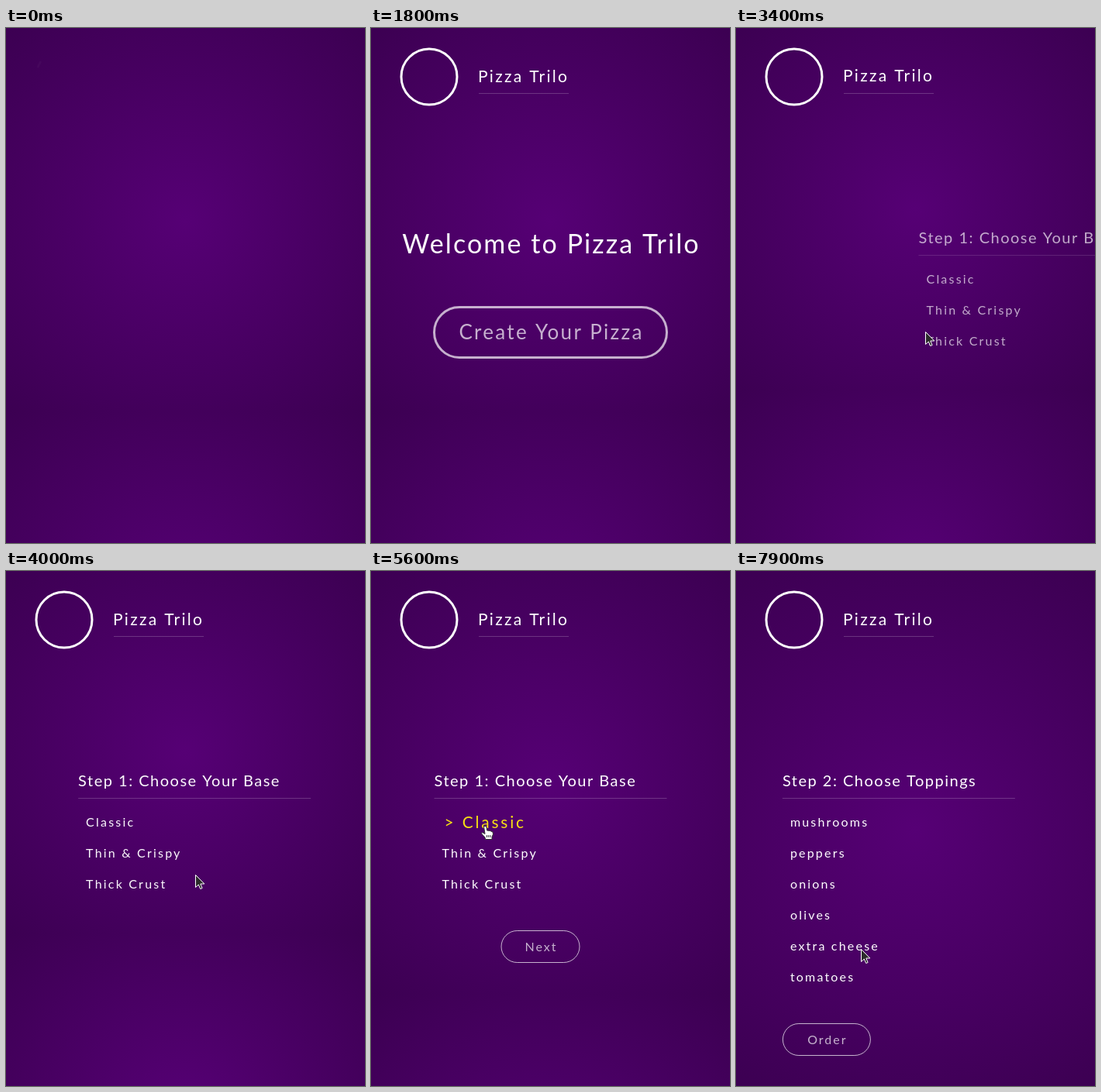
An HTML page with a canvas for the animation above (8000 ms loop, 463x665 px).

```html
<!DOCTYPE html>
<html lang="en">
<head>
<meta charset="utf-8">
<title>Pizza order</title>
<style>
html, body { margin: 0; width: 100%; height: 100%; overflow: hidden; background: #3c0052; }
canvas { display: block; width: 463px; height: 665px; }
</style>
</head>
<body>
<canvas id="stage"></canvas>
<script>
const W = 463, H = 665, LOOP = 8000;
const canvas = document.getElementById('stage');
const ctx = canvas.getContext('2d');
const dpr = window.devicePixelRatio || 1;
canvas.width = W * dpr;
canvas.height = H * dpr;

const BRAND = 'Pizza Trilo';
const BASES = ['Classic', 'Thin & Crispy', 'Thick Crust'];
const TOPPINGS = ['mushrooms', 'peppers', 'onions', 'olives', 'extra cheese', 'tomatoes'];
const LEFT = (W - 300) / 2;

// Moments of the story, in ms
const LOGO_IN = -238, HEADER_IN = 33, HOME_IN = 420, HOME_OUT = 2440, BASE_IN = 3240;
const PICK = 5311, BASE_OUT = 6568, TOPPINGS_IN = 7368;
const EXIT = 300, DELAY = 500;

// [item, pointer enters, pointer leaves]
const HOVERS = [[2, 4510, 4600], [1, 4600, 4690], [0, 4690, 5690], [1, 5690, 5770], [2, 5770, 5850]];
// [time, x, y] of the pointer tip
const POINTER = [[2000, 256, 472], [2150, 244.5, 392], [4480, 244.5, 392], [4800, 145.5, 330],
  [5650, 145.5, 330], [5950, 161.5, 488]];
const HAND_TIMES = [[2080, 2600], [4510, 5850], [5900, 6720]];

const clamp = v => Math.max(0, Math.min(1, v));
const mix = (a, b, k) => a + (b - a) * k;

// cubic-bezier(.42, 0, .58, 1)
function ease(x) {
  x = clamp(x);
  let lo = 0, hi = 1;
  for (let i = 0; i < 22; i++) {
    const s = (lo + hi) / 2, r = 1 - s;
    if (1.26 * s * r * r + 1.74 * s * s * r + s * s * s < x) lo = s; else hi = s;
  }
  return lo * lo * (3 - 2 * lo);
}

// Remaining distance (1 to 0) of a spring with damping 10 and mass 1
function spring(ms, stiffness) {
  if (ms <= 0) return 1;
  const t = ms / 1000, w = Math.sqrt(stiffness - 25);
  return Math.exp(-5 * t) * (Math.cos(w * t) + 5 / w * Math.sin(w * t));
}

// Back-and-forth between 0 and 1, 300 ms each way
function yoyo(ms) {
  if (ms <= 0) return 0;
  const p = ms / 300 % 2;
  return ease(p < 1 ? p : 2 - p);
}

function text(str, x, y, size, spacing, align = 'left') {
  ctx.font = `400 ${size}px Lato, "Open Sans", sans-serif`;
  ctx.letterSpacing = spacing + 'px';
  ctx.textAlign = align;
  ctx.fillText(str, align === 'center' ? x + spacing / 2 : x, y);
}

function rule(x, y, w) {
  ctx.fillStyle = 'rgba(255,255,255,.2)';
  ctx.fillRect(x, y, w, 1);
  ctx.fillStyle = '#fff';
}

function layer(alpha, x, draw) {
  ctx.save();
  ctx.globalAlpha = clamp(alpha);
  ctx.translate(x, 0);
  draw();
  ctx.restore();
}

function background(h) {
  const r = Math.hypot(W / 2, h / 2);
  for (let y = 0; y < H; y += h) {
    const g = ctx.createRadialGradient(W / 2, y + h / 2, 0, W / 2, y + h / 2, r);
    g.addColorStop(0, 'rgb(86,0,117)');
    g.addColorStop(1, 'rgb(60,0,82)');
    ctx.fillStyle = g;
    ctx.fillRect(0, y, W, h);
  }
}

function button(label, x, y, w, h, border, size, spacing, hover = 0) {
  const s = 1 + hover * 0.1;
  const outline = () => {
    ctx.beginPath();
    ctx.roundRect(-w / 2, -h / 2, w, h, h / 2);
  };
  ctx.save();
  ctx.globalAlpha *= 0.7;
  ctx.translate(x + w / 2, y + h / 2);
  ctx.scale(s, s);
  ctx.strokeStyle = ctx.fillStyle = '#fff';
  if (hover > 0) {
    ctx.shadowColor = `rgba(255,255,255,${hover})`;
    ctx.shadowBlur = 8 * s * dpr;
    ctx.save();
    outline();
    ctx.rect(-W, -H, 2 * W, 2 * H);
    ctx.clip('evenodd');
    outline();
    ctx.fill();
    ctx.restore();
  }
  text(label, 0, size * 0.36, size, spacing, 'center');
  ctx.shadowColor = 'transparent';
  ctx.lineWidth = border;
  ctx.beginPath();
  ctx.roundRect((border - w) / 2, (border - h) / 2, w - border, h - border, (h - border) / 2);
  ctx.stroke();
  ctx.restore();
}

function header(t) {
  const drawn = ease((t - LOGO_IN) / 2000);
  const turn = Math.PI * (ease((t - LOGO_IN) / 1000) - 1);
  layer(drawn, 0, () => {
    ctx.strokeStyle = '#fff';
    ctx.lineWidth = 3;
    ctx.lineCap = 'round';
    ctx.beginPath();
    ctx.arc(75, 63, 36, turn, turn + 2 * Math.PI * drawn);
    ctx.stroke();
  });
  ctx.save();
  ctx.translate(0, -240 * spring(t - HEADER_IN, 120));
  ctx.fillStyle = '#fff';
  text(BRAND, 138, 69.5, 21, 2.3);
  rule(139, 84, 116);
  ctx.restore();
}

function home(t) {
  if (t >= HOME_OUT + EXIT) return;
  layer(ease((t - HOME_IN) / 1500), -W * ease((t - HOME_OUT) / EXIT), () => {
    ctx.fillStyle = '#fff';
    text('Welcome to ' + BRAND, W / 2, 291, 34, 2.1, 'center');
    button('Create Your Pizza', 80, 359, 303, 68, 3, 26, 2.3, yoyo(t - 2080));
  });
}

function heading(str) {
  ctx.fillStyle = '#fff';
  text(str, LEFT, 278, 20, 1.5);
  rule(LEFT, 293, 300);
}

// Hover amount of a list item: spring steps added up
function hoverOf(item, t) {
  return HOVERS.reduce((sum, [i, on, off]) =>
    i === item ? sum + spring(t - off, 300) - spring(t - on, 300) : sum, 0);
}

function listItem(str, i, hover = 0) {
  const k = clamp(hover), s = 1 + 0.3 * hover;
  ctx.save();
  ctx.translate(LEFT, 324 + 40 * i);
  ctx.scale(s, s);
  ctx.fillStyle = `rgb(${mix(255, 248, k)},${mix(255, 225, k)},${mix(255, 18, k)})`;
  text(str, 10, 5.8, 16, 2.2);
  ctx.restore();
}

function bases(t) {
  if (t < BASE_IN || t >= BASE_OUT + EXIT) return;
  const d = spring(t - BASE_IN, 100);
  layer(1 - d, W * d - W * ease((t - BASE_OUT) / EXIT), () => {
    heading('Step 1: Choose Your Base');
    BASES.forEach((name, i) => {
      const picked = i === 0 && t >= PICK;
      listItem((picked ? '> ' : '') + name, i, hoverOf(i, t));
    });
    if (t >= PICK) {
      button('Next', LEFT - W * spring(t - PICK, 120), 464, 102, 42, 1, 16, 2, yoyo(t - 5900));
    }
  });
}

function toppings(t) {
  if (t < TOPPINGS_IN) return;
  const d = spring(t - TOPPINGS_IN, 100);
  layer(1 - d, W * d, () => {
    heading('Step 2: Choose Toppings');
    TOPPINGS.forEach((name, i) => listItem(name, i));
    button('Order', LEFT, 584, 114, 42, 1, 16, 2);
  });
}

function polygon(points) {
  ctx.beginPath();
  for (let i = 0; i < points.length; i += 2) ctx.lineTo(points[i], points[i + 1]);
  ctx.closePath();
  ctx.fill();
  ctx.stroke();
}

function pointer(t) {
  if (t < POINTER[0][0]) return;
  let [, x, y] = POINTER[POINTER.length - 1];
  const n = POINTER.findIndex(p => p[0] > t);
  if (n > 0) {
    const a = POINTER[n - 1], b = POINTER[n];
    const k = ease((t - a[0]) / (b[0] - a[0]));
    x = mix(a[1], b[1], k);
    y = mix(a[2], b[2], k);
  }
  ctx.save();
  ctx.translate(x, y);
  ctx.lineJoin = 'round';
  ctx.lineWidth = 1;
  if (HAND_TIMES.some(([on, off]) => t >= on && t < off)) {
    ctx.fillStyle = '#fff';
    ctx.strokeStyle = '#333';
    polygon([0, 0, 2, -0.5, 3.5, 1, 4, 5, 8, 5.5, 11.5, 7, 12, 10, 10.5, 13,
      10.5, 16.5, 2, 16.5, 1.5, 14, -3, 9, -2, 7.5, 1.5, 9.5]);
    ctx.beginPath();
    for (let i = 0; i < 3; i++) {
      ctx.moveTo(4 + 2.2 * i, 11);
      ctx.lineTo(4 + 2.2 * i, 14);
    }
    ctx.stroke();
  } else {
    ctx.fillStyle = '#2b2b2b';
    ctx.strokeStyle = '#fff';
    polygon([0, 0.5, 0, 16.5, 3.8, 13, 6.2, 18.5, 8.6, 17.5, 6.3, 12, 11.3, 12]);
  }
  ctx.restore();
}

// The gradient repeats with the height of the current page
function pageHeight(t) {
  if (t < BASE_IN - DELAY) return 496;
  if (t < PICK) return 468;
  return t < TOPPINGS_IN - DELAY ? 546 : 666;
}

function draw(t) {
  ctx.setTransform(dpr, 0, 0, dpr, 0, 0);
  background(pageHeight(t));
  header(t);
  home(t);
  bases(t);
  toppings(t);
  pointer(t);
}

const start = performance.now();
function tick() {
  draw((performance.now() - start) % LOOP);
  requestAnimationFrame(tick);
}
tick();
</script>
</body>
</html>
```
